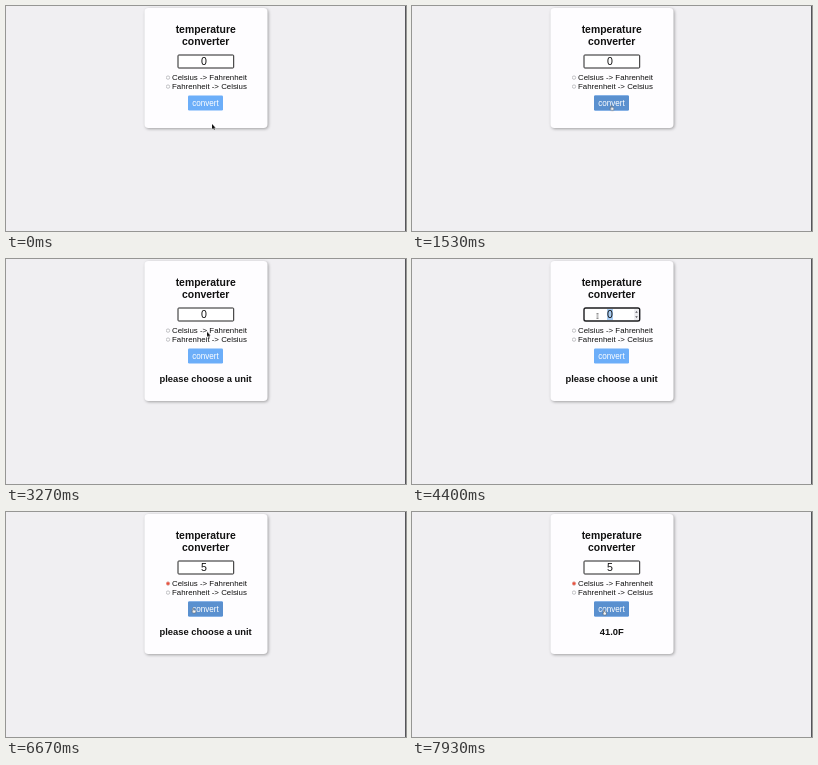
Write an HTML page that moves like this. It is 400x225 px and loops after 8000 ms.

```html
<!DOCTYPE html>
<html lang="en">
<head>
<meta charset="utf-8">
<title>temperature converter</title>
<style>
html, body { margin: 0; width: 100%; height: 100%; overflow: hidden; background: #f0eff2; }
svg { display: block; width: 100vw; height: 100vh; font-family: "Liberation Sans", Arial, sans-serif; }
text { fill: #111; }
.mid { text-anchor: middle; }
.title { font-weight: bold; font-size: 10.4px; }
.label { font-size: 7.87px; fill: #1c1c20; }
.value { font-size: 10.6px; }
.result { font-weight: bold; font-size: 9.4px; }
.card { fill: #fefdff; filter: drop-shadow(1.5px 1.8px 1.6px #0005); }
.radio { fill: #fff; stroke: #8b8b90; stroke-width: .5; }

/* Every part shares one 8 s timeline: 1% = 80 ms */
.on { animation: 8s step-end infinite; }
.card { animation: grow 8s step-end infinite; }
.hover { animation-name: hover; }
.prompt { animation-name: prompt; }
.answer { animation-name: answer; }
.spin { animation-name: spin; }
.focus { animation-name: focus; }
.blur { animation-name: blur; }
.select { animation-name: select; }
.zero { animation-name: zero; }
.five { animation-name: five; }
.caret { animation-name: caret; }
.checked { animation-name: checked; }
.arrow { animation-name: arrow; }
.hand { animation-name: hand; }
.beam { animation-name: beam; }
.pointer { animation: travel 8s linear infinite; }

@keyframes grow { 0% { height: 120px } 27.5%, 100% { height: 140px } }
@keyframes hover { 0%, 36.6% { opacity: 0 } 10.8%, 82.4%, 100% { opacity: 1 } }
@keyframes prompt { 0%, 90%, 100% { opacity: 0 } 27.5% { opacity: 1 } }
@keyframes answer { 0% { opacity: 0 } 90%, 100% { opacity: 1 } }
@keyframes spin { 0%, 77.5%, 100% { opacity: 0 } 42.4% { opacity: 1 } }
@keyframes focus { 0%, 77.5%, 100% { opacity: 0 } 44% { opacity: 1 } }
@keyframes blur { 0%, 77.5%, 100% { opacity: 1 } 44% { opacity: 0 } }
@keyframes select { 0%, 61.6%, 100% { opacity: 0 } 46.6% { opacity: 1 } }
@keyframes zero { 0% { opacity: 1 } 61.6%, 100% { opacity: 0 } }
@keyframes five { 0% { opacity: 0 } 61.6%, 100% { opacity: 1 } }
@keyframes caret { 0%, 46.6%, 68.3%, 100% { opacity: 0 } 44.1%, 61.6% { opacity: 1 } }
@keyframes checked { 0% { opacity: 0 } 77.5%, 100% { opacity: 1 } }
@keyframes arrow { 0%, 36.6%, 63.3% { opacity: 1 } 10.8%, 42.4%, 82.4%, 100% { opacity: 0 } }
@keyframes hand { 0%, 36.6% { opacity: 0 } 10.8%, 82.4%, 100% { opacity: 1 } }
@keyframes beam { 0%, 63.3%, 100% { opacity: 0 } 42.4% { opacity: 1 } }
@keyframes travel {
  0%, .8% { transform: translate(206px, 118px) }
  9.1% { transform: translate(199.3px, 106px) }
  10.8% { transform: translate(199.3px, 103px) }
  12.5%, 19% { transform: translate(199.4px, 99.5px) }
  19.1%, 35.8% { transform: translate(199.4px, 99.2px) }
  44.1%, 45.8% { transform: translate(202px, 56px) }
  48.4%, 53.3% { transform: translate(187px, 56.5px) }
  55%, 61.6% { transform: translate(185.5px, 57px) }
  66.6%, 73.3% { transform: translate(183px, 72px) }
  73.36% { transform: translate(175.3px, 74px) }
  77%, 80.8% { transform: translate(162px, 71px) }
  83.3% { transform: translate(187.2px, 95.8px) }
  87.5%, 96.6% { transform: translate(191px, 98.7px) }
  98.3% { transform: translate(189px, 97.2px) }
  99.1%, 100% { transform: translate(192px, 97.8px) }
}
</style>
</head>
<body>
<svg viewBox="0 0 400 225">
  <rect width="400" height="225" fill="#f0eff2"/>
  <rect x="399" width="1" height="225" fill="#55555a"/>
  <rect class="card" x="138.5" y="2" width="123" height="120" rx="4"/>

  <g class="mid title">
    <text x="199.7" y="26.5">temperature</text>
    <text x="199.7" y="38.8">converter</text>
  </g>

  <rect class="on blur" x="172" y="49" width="55.7" height="13" rx=".8" fill="#fff" stroke="#222" stroke-width="1"/>
  <rect class="on focus" x="172" y="49" width="55.7" height="13" rx="1.8" fill="#fff" stroke="#1b1b1e" stroke-width="1.4"/>
  <rect class="on select" x="195" y="50" width="6" height="11" fill="#a9cdf3"/>
  <g class="mid value">
    <text class="on zero" x="198" y="59.2">0</text>
    <text class="on five" x="198" y="59.2">5</text>
  </g>
  <path class="on caret" d="M201.3 50.5V60.5" stroke="#222" stroke-width=".6"/>
  <g class="on spin">
    <rect x="222.2" y="50" width="4.6" height="11" fill="#ececef"/>
    <path d="M223.2 53.8L224.5 52L225.8 53.8ZM223.2 57.3L224.5 59.1L225.8 57.3Z" fill="#55555a"/>
  </g>

  <circle class="radio" cx="162" cy="71.6" r="1.7"/>
  <circle class="radio" cx="162" cy="80.6" r="1.7"/>
  <g class="on checked">
    <circle cx="162" cy="71.6" r="2" fill="#f6b3aa"/>
    <circle cx="162" cy="71.6" r="1.4" fill="#e4513f"/>
  </g>
  <g class="label">
    <text x="166" y="74">Celsius -&gt; Fahrenheit</text>
    <text x="166" y="83">Fahrenheit -&gt; Celsius</text>
  </g>

  <rect x="182" y="89.5" width="35" height="15" rx="1.3" fill="#6caef9"/>
  <rect class="on hover" x="182" y="89.5" width="35" height="15" rx="1.3" fill="#5a90cf"/>
  <text class="mid" x="199.5" y="99.8" font-size="8.15" style="fill:#fff">convert</text>

  <g class="mid result">
    <text class="on prompt" x="199.6" y="122.6">please choose a unit</text>
    <text class="on answer" x="199.7" y="122.6">41.0F</text>
  </g>

  <g class="pointer">
    <path class="on arrow" d="M0 0V5L1.2 4L2 5.8L2.9 5.4L2.1 3.7H3.6Z" fill="#111" stroke="#fff" stroke-width=".4" paint-order="stroke"/>
    <path class="on hand" d="M-.5 .3Q0-.4 .5 .3V2L2.1 2.4Q2.6 2.6 2.5 3.4L2 5.2H-.3L-1.5 3.2Q-1.3 2.6-.5 3.2Z" fill="#fff" stroke="#222" stroke-width=".4"/>
    <path class="on beam" d="M-1-2.5Q0-2.5 0-2Q0-2.5 1-2.5M0-2V2M-1 2.5Q0 2.5 0 2Q0 2.5 1 2.5" fill="none" stroke="#333" stroke-width=".6"/>
  </g>
</svg>
</body>
</html>
```
